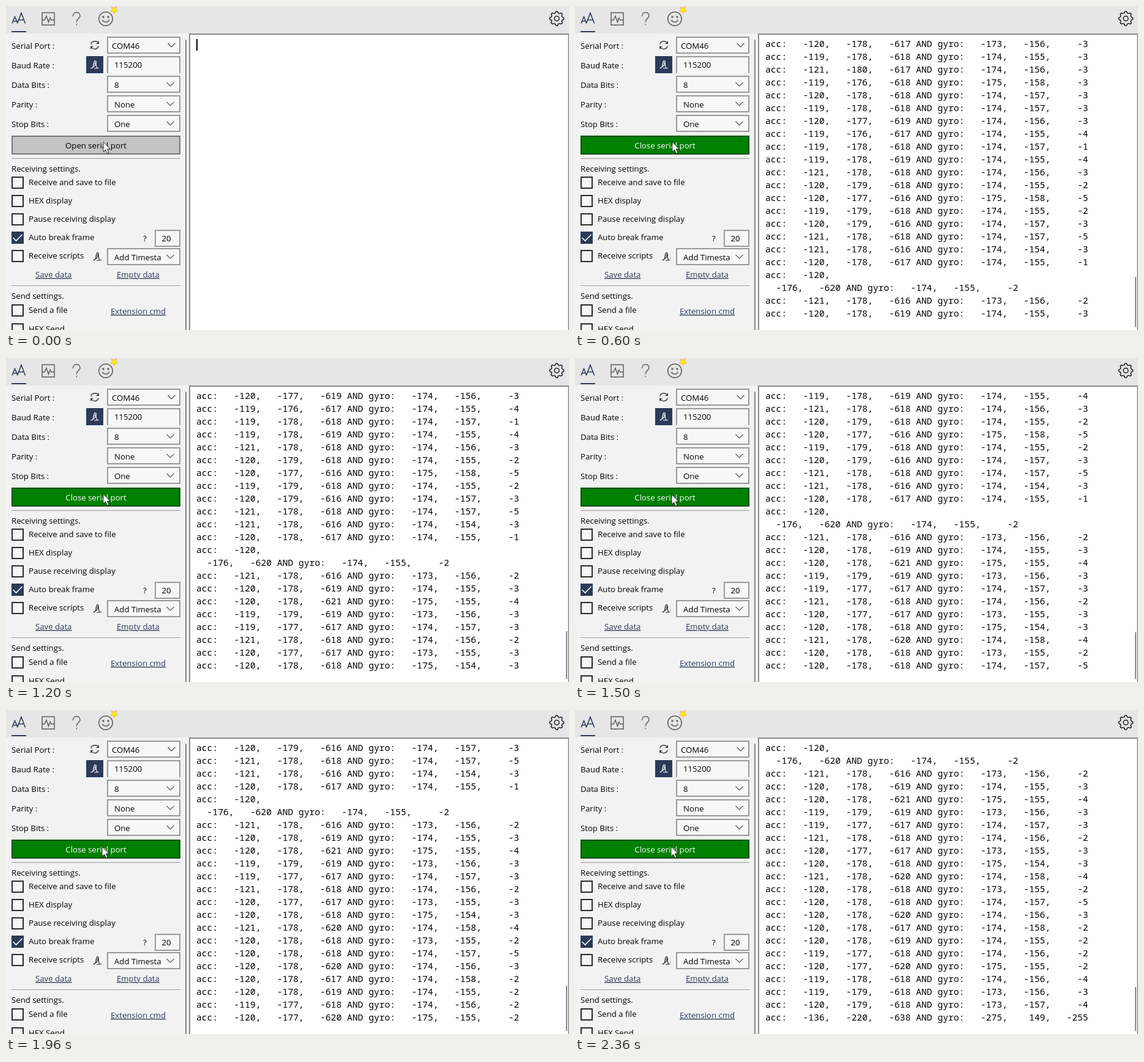
An HTML page that plays this animation: 920 px wide and 530 px high, repeating every 2460 ms.

```html
<!DOCTYPE html>
<html lang="en">
<head>
<meta charset="utf-8">
<title>Serial monitor</title>
<style>
  html, body { margin: 0; width: 100%; height: 100%; overflow: hidden; }
  svg { display: block; width: 920px; height: 530px; background: #f2f2f2; }
  text { font: 13.2px "Open Sans", "Noto Sans", sans-serif; fill: #000; }
  #log text { font: 14.66px "Noto Sans Mono", "DejaVu Sans Mono", monospace; white-space: pre; }
  .link { fill: #2b3a58; text-decoration: underline; }
  .line { fill: none; stroke: #5c5c5c; stroke-width: 1.5; }
  .field { fill: #f7f7f7; stroke: #999; stroke-width: 2; }
  .box { fill: #f7f7f7; stroke: #2a2a2a; stroke-width: 2; }
  .navy { fill: #2b3a58; }
</style>
</head>
<body>
<svg viewBox="0 0 920 530">
  <defs>
    <path id="chevron" d="M-6 -3 L0 3 L6 -3" fill="none" stroke="#555" stroke-width="1.1"/>
    <path id="quill" d="M-6.5 5.5 C-2 6 -2.5 2 -1.5 -2.5 C-1 -5.5 0 -7 1.5 -6.2 C3.5 -5 1.5 -1 2.5 2 C3 4.5 4 6 6.5 5.5 M-3 2.5 C0 4 1.5 0 .5 -4 M-1 6 H4"
      fill="none" stroke="currentColor" stroke-width="1.2"/>
  </defs>

  <!-- toolbar -->
  <rect width="920" height="45" fill="#e6e6e6"/>
  <path class="line" style="stroke:#2b3a58;stroke-width:1.6" d="M10 28.5 L14.5 17.5 L19 28.5 M11.7 24.8 H17.3 M18.5 28.5 L25 11.5 L31.5 28.5 M20.8 22.8 H29.2"/>
  <rect class="navy" x="9" y="41" width="24" height="2"/>
  <rect class="line" x="59" y="11" width="20" height="20"/>
  <path class="line" d="M59 23 H63 L66 16.5 L69.5 26.5 L72 19.5 L74 23 H79"/>
  <path class="line" d="M109.5 17 C109.5 8.5 121 8.5 121 16 C121 20.5 115.3 20.5 115.3 26.5 M115.3 29.2 V31.2"/>
  <circle class="line" cx="163" cy="21" r="11.2"/>
  <path class="line" d="M157.3 23 Q163 30 168.7 23"/>
  <g fill="#5c5c5c"><circle cx="159" cy="18" r="1.7"/><circle cx="167" cy="18" r="1.7"/></g>
  <path id="spark" fill="#ffe619" stroke="#e59a1c" stroke-width=".8" stroke-dasharray="2 1"/>
  <path id="gear" fill="none" stroke="#1c1c1c" stroke-width="1.5" stroke-linejoin="round"/>
  <circle cx="900" cy="20.5" r="3.9" fill="none" stroke="#1c1c1c" stroke-width="1.5"/>

  <!-- settings panel -->
  <g id="panel"></g>
  <g fill="none" stroke="#222" stroke-width="1.2">
    <path d="M138.8 62.5 A6.5 6.5 0 0 1 150.8 61 M151.2 65.5 A6.5 6.5 0 0 1 139.2 67"/>
    <path d="M151.3 57.5 V61.5 H147.3 M138.7 70.5 V66.5 H142.7"/>
  </g>
  <rect class="navy" x="131" y="82" width="28" height="28"/>
  <use href="#quill" x="145" y="96" color="#fff"/>
  <use href="#quill" x="149" y="410" color="#222"/>
  <path class="line" style="stroke:#fff;stroke-width:1.6" d="M11.5 379 L16.5 384 L26.5 374"/>
  <path d="M9 249.5 H285 M9 457.5 H285" stroke="#999"/>
  <rect x="293" y="55" width="2" height="475" fill="#868686"/>
  <rect id="button" x="9" y="212" width="276" height="31"/>
  <rect id="edge" x="10" y="213" width="274" height="29" fill="none" stroke="#000" stroke-opacity=".4" stroke-width="2"/>
  <text id="caption" x="147" y="233" text-anchor="middle"></text>

  <!-- log -->
  <rect x="300" y="46" width="619.5" height="500" fill="#fff" stroke="#8a8a8a" stroke-width="2"/>
  <rect id="caret" x="311" y="54" width="2" height="19"/>
  <g id="log"></g>
  <rect id="thumb" x="915" width="2" fill="#868686"/>

  <g id="mouse">
    <path d="M1.5 2 V18 L5.5 14.5 L8.3 20.5 L11 19.3 L8.3 13.5 H13.5 Z" opacity=".22"/>
    <path d="M.5 .5 V16.5 L4.2 13 L6.8 19 L9.4 17.8 L6.8 12 H11.8 Z" fill="#fff" stroke="#222" stroke-width=".9"/>
  </g>
</svg>

<script>
const LOOP = 2460, ROWS = 22, ROW_H = 21;
const $ = id => document.getElementById(id);

function add(parent, tag, attrs, content = "") {
  const el = document.createElementNS("http://www.w3.org/2000/svg", tag);
  for (const k in attrs) el.setAttribute(k, attrs[k]);
  el.textContent = content;
  return parent.appendChild(el);
}

// Closed outline around a centre: the radii repeat once per tooth
function cog(cx, cy, teeth, radii, turn) {
  const n = teeth * radii.length;
  const pts = Array.from({ length: n }, (_, i) => {
    const a = i / n * 2 * Math.PI + turn, r = radii[i % radii.length];
    return (cx + r * Math.cos(a)).toFixed(2) + " " + (cy + r * Math.sin(a)).toFixed(2);
  });
  return "M" + pts.join("L") + "Z";
}
$("gear").setAttribute("d", cog(900, 20.5, 8, [11.6, 11.6, 9.2, 9.2], -Math.PI / 32));
$("spark").setAttribute("d", cog(176.5, 6.5, 5, [6.5, 3.2], -1));

// Settings panel
const panel = $("panel");
const label = (x, y, s, cls = "") => add(panel, "text", { x, y, class: cls }, s);
const rect = (cls, x, y, width, height) => add(panel, "rect", { class: cls, x, y, width, height });
const field = (x, y, w, h) => rect("field", x + 1, y + 1, w - 2, h - 2);

function combo(y, value, x = 177, arrow = 268.5) {
  field(165, y, 120, 28);
  label(x, y + 20, value);
  add(panel, "use", { href: "#chevron", x: arrow, y: y + 14 });
}
function check(y, name, on) {
  if (on) rect("navy", 9, y, 20, 20);
  else rect("box", 10, y + 1, 18, 18);
  label(37, y + 14, name);
}

["Serial Port :", "Baud Rate :", "Data Bits :", "Parity :", "Stop Bits :"]
  .forEach((s, i) => label(9, 69.5 + 32 * i, s));
combo(50, "COM46", 173, 270.5);
add(panel, "path", { class: "field", d: "M166 110 V83 H284 V110" });
label(177, 101, "115200");
["8", "None", "One"].forEach((s, i) => combo(114 + 32 * i, s));
label(9, 271, "Receiving settings.");
["Receive and save to file", "HEX display", "Pause receiving display", "Auto break frame", "Receive scripts"]
  .forEach((s, i) => check(279 + 30 * i, s, i === 3));
label(224, 385, "?");
field(243, 366, 42, 28);
label(254.5, 385, "20");
combo(396, "Add Timesta");
label(48, 444, "Save data", "link");
label(181, 444, "Empty data", "link");
label(9, 479, "Send settings.");
check(488, "Send a file");
check(519, "HEX Send");
label(171, 504, "Extension cmd", "link");

// Sensor log: a board at rest with jitter, then knocked on the last row
const EARLY = 5, BROKEN = EARLY + 18, SAMPLES = EARLY + 38;
const REST = [-120, -178, -618, -174, -156, -3];
const JITTER = [1.6, 2, 3, 1.5, 2, 2];
const KNOCK = [-136, -220, -638, -275, 149, -255];

let seed = 7;
const random = () => (seed = seed * 16807 % 2147483647) / 2147483647;
const sample = () => REST.map((v, i) => v + Math.round((random() + random() - 1) * JITTER[i]));
const triple = v => v.map(n => String(n).padStart(7)).join(",");
const format = v => "acc:" + triple(v.slice(0, 3)) + " AND gyro:" + triple(v.slice(3));

const lines = Array.from({ length: SAMPLES }, () => format(sample()));
lines.push(format(KNOCK));
// One row arrived in two pieces
const split = lines[BROKEN].indexOf(",") + 1;
lines.splice(BROKEN, 1, lines[BROKEN].slice(0, split), lines[BROKEN].slice(split + 1));

const rows = Array.from({ length: ROWS }, (_, i) => add($("log"), "text", { x: 311, y: 67 + i * ROW_H }));

// One row per 100 ms, with two short stalls
function scrollAt(t) {
  if (t < 100) return null;
  if (t >= 1660) return 11 + Math.floor((t - 1660) / 100);
  if (t >= 500 && t < 600) return -2;
  return Math.min(9, Math.floor(t / 100) - 6);
}

let shown;
function render(t) {
  const top = scrollAt(t);
  if (top === shown) return;
  shown = top;
  const open = top !== null;
  rows.forEach((r, i) => r.textContent = open ? lines[EARLY + top + i] : "");
  $("caret").style.display = open ? "none" : "";
  const h = open ? 10630 / (130 + top) : 0;
  $("thumb").setAttribute("y", 525 - h);
  $("thumb").setAttribute("height", h);
  $("button").setAttribute("fill", open ? "#008000" : "#c3c3c3");
  $("edge").style.display = open && top < 0 ? "none" : "";
  $("caption").textContent = open ? "Close serial port" : "Open serial port";
  $("caption").style.fill = open ? "#fff" : "#000";
  const drift = t < 1300 ? 0 : t < 1860 ? 1 : 2;
  $("mouse").setAttribute("transform", `translate(${158.5 - drift} ${222 + (drift > 0)})`);
}

const start = performance.now();
function tick() {
  render((performance.now() - start) % LOOP);
  requestAnimationFrame(tick);
}
tick();
</script>
</body>
</html>
```
